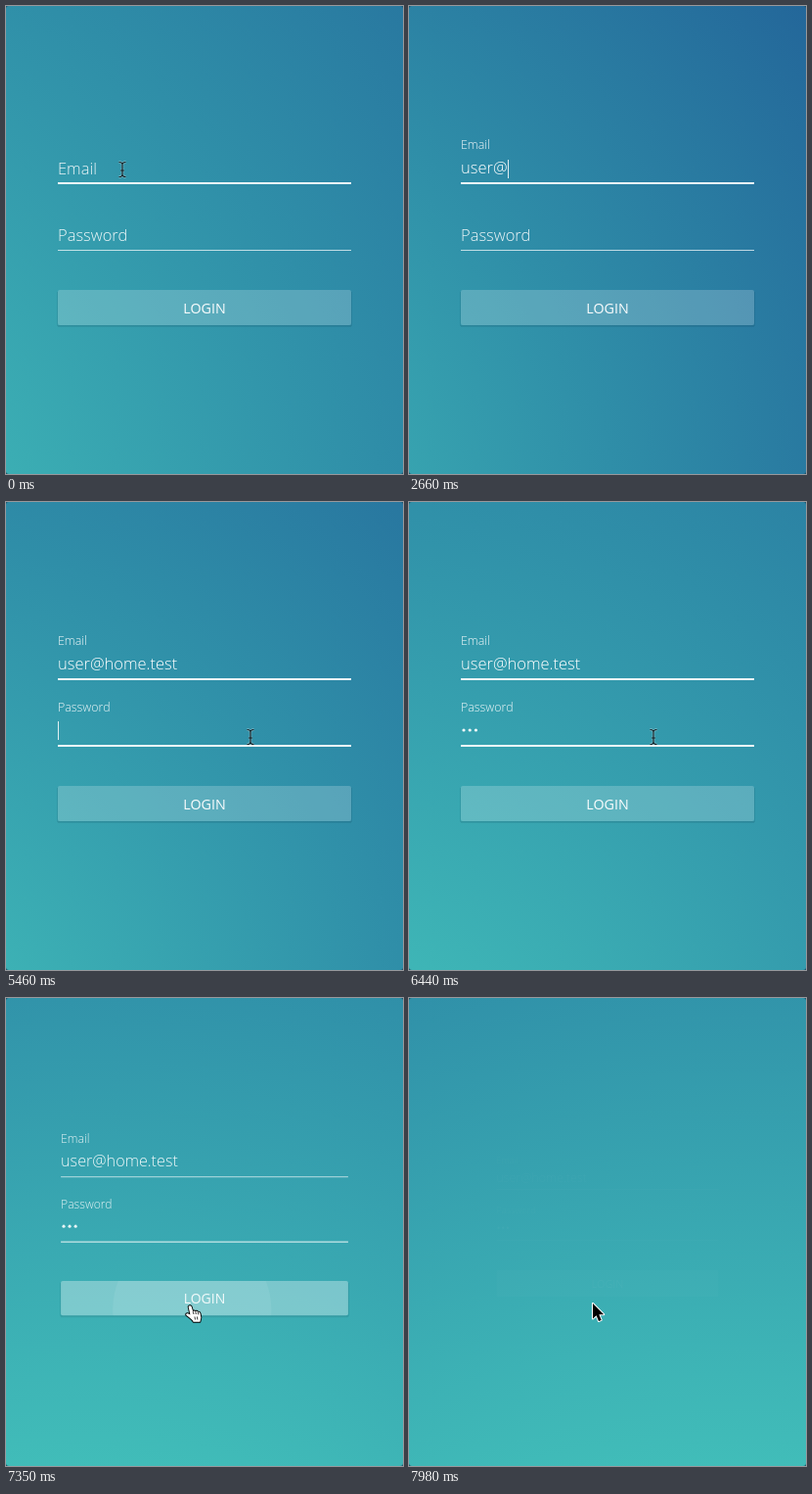
Recreate the animation shown at these times as an HTML page with a canvas. Size 406 by 478 pixels, loop 8000 ms.

```html
<!DOCTYPE html>
<html lang="en">
<head>
<meta charset="utf-8">
<title>Login</title>
<style>
  html, body { margin: 0; width: 100%; height: 100%; overflow: hidden; background: #1c4f66; }
  canvas { display: block; width: 406px; height: 478px; }
</style>
</head>
<body>
<canvas id="stage"></canvas>
<script>
const W = 406, H = 478, LOOP = 8000, LEFT = 53, RIGHT = 353;
const canvas = document.getElementById('stage');
const ctx = canvas.getContext('2d');
const dpr = window.devicePixelRatio || 1;
canvas.width = W * dpr;
canvas.height = H * dpr;

const FAMILY = '"Open Sans", "Noto Sans", sans-serif';
const ADDRESS = 'user@home.test';
const KEYS = [1820, 2030, 2170, 2380, 2660, 2800, 2940, 3150, 3290, 3570, 3780, 3990, 4130, 4270];
const DOTS = [5600, 5670, 5810];

// time, glow centre x and y, inner radius, span
const GLOW = [
  [0, -380, 660, 251, 1064],
  [2660, -300, 560, 52, 926],
  [4270, -260, 520, 30, 833],
  [6440, -112, 700, 157, 1150],
  [6930, -66, 870, 397, 1053],
  [7560, 150, 1080, 598, 1110],
  [8000, 346, 1238, 760, 1110]
];
// time, pointer x and y
const POINTER = [
  [0, 119, 167], [4830, 119, 167], [5110, 250, 240],
  [6460, 250, 240], [6860, 188, 314], [7600, 188, 314], [7840, 188, 312]
];

const clamp = v => Math.max(0, Math.min(1, v));
const ramp = (t, from, to) => clamp((t - from) / (to - from));
const smooth = p => p * p * (3 - 2 * p);
const mix = (a, b, p) => a + (b - a) * p;
const typed = (keys, t) => keys.filter(k => k <= t).length;
const white = a => `rgba(255,255,255,${a})`;

function sample(track, t, ease = p => p) {
  let i = 0;
  while (i < track.length - 2 && t >= track[i + 1][0]) i++;
  const a = track[i], b = track[i + 1];
  const p = ease(ramp(t, a[0], b[0]));
  return a.slice(1).map((v, n) => mix(v, b[n + 1], p));
}

function drawBackground(t) {
  const [x, y, inner, span] = sample(GLOW, t);
  const g = ctx.createRadialGradient(x, y, inner, x, y, inner + span);
  g.addColorStop(0, 'rgb(65,189,185)');
  g.addColorStop(0.5, 'rgb(47,142,168)');
  g.addColorStop(1, 'rgb(33,95,151)');
  ctx.fillStyle = '#1c4f66';
  ctx.fillRect(0, 0, W, H);
  ctx.fillStyle = g;
  ctx.beginPath();
  ctx.roundRect(0, 0, W, H, 3);
  ctx.fill();
}

function text(str, x, y, size, weight, alpha) {
  ctx.font = `${weight} ${size}px ${FAMILY}`;
  ctx.fillStyle = white(alpha);
  ctx.fillText(str, x, y);
}

function drawField(name, y, lift, focus) {
  text(name, LEFT, mix(y - 9, y - 35, lift), mix(16.5, 12.4, lift), 300, 0.92);
  ctx.fillStyle = white(mix(0.7, 0.92, focus));
  ctx.fillRect(LEFT, y - focus, RIGHT - LEFT, 1 + focus);
}

function drawCaret(x, y) {
  ctx.fillStyle = white(0.85);
  ctx.fillRect(Math.round(x), y - 9, 1, 19);
}

// Solid after each key press, then blinking
function caretOn(t, start, keys) {
  const last = keys.filter(k => k <= t).pop() || start;
  return Math.floor((t - last) / 530) % 2 === 0;
}

function drawButton(t) {
  const hover = ramp(t, 6720, 6880);
  ctx.fillStyle = 'rgba(0,40,60,.16)';
  ctx.fillRect(LEFT, 326, 300, 1);
  ctx.fillStyle = 'rgba(0,40,60,.1)';
  ctx.fillRect(LEFT, 327, 300, 1);
  ctx.fillRect(LEFT - 1, 292, 1, 35);
  ctx.fillRect(RIGHT, 292, 1, 35);
  ctx.save();
  ctx.beginPath();
  ctx.roundRect(LEFT, 290, 300, 36, 2);
  ctx.fillStyle = white(mix(0.2, 0.36, hover));
  ctx.fill();
  if (t >= 7030) {
    ctx.clip();
    ctx.beginPath();
    ctx.arc(190, 320, (t - 7030) * 0.258, 0, 7);
    ctx.fillStyle = white(0.08);
    ctx.fill();
  }
  ctx.restore();
  ctx.textAlign = 'center';
  text('LOGIN', 203, 314, 14.3, 400, 0.97);
  ctx.textAlign = 'left';
}

function drawForm(t) {
  const exit = Math.pow(ramp(t, 7210, 8000), 1.45);
  const scale = 1 - 0.25 * exit;
  ctx.save();
  ctx.globalAlpha = 1 - exit;
  ctx.translate(203, 240);
  ctx.scale(scale, scale);
  ctx.translate(-203, -240);

  drawField('Email', 181, smooth(ramp(t, 280, 580)), 1 - ramp(t, 6500, 6720));
  const focus = ramp(t, 5110, 5320) * (1 - ramp(t, 7210, 7420));
  drawField('Password', 249, smooth(ramp(t, 5110, 5410)), focus);

  const entry = ADDRESS.slice(0, typed(KEYS, t));
  text(entry, LEFT, 171, 16.5, 300, 1);
  if (t >= 580 && t < 5110 && caretOn(t, 580, KEYS)) {
    drawCaret(LEFT + ctx.measureText(entry).width, 166);
  }

  const count = typed(DOTS, t);
  ctx.fillStyle = white(0.95);
  for (let i = 0; i < count; i++) {
    ctx.beginPath();
    ctx.arc(56 + i * 6.2, 233, 1.6, 0, 7);
    ctx.fill();
  }
  if (t >= 5410 && t < 7210 && caretOn(t, 5410, DOTS)) drawCaret(LEFT + count * 6.1, 233);

  drawButton(t);
  ctx.restore();
}

function outline(path, fill, edge, width) {
  ctx.lineJoin = 'round';
  ctx.lineWidth = width;
  ctx.strokeStyle = edge;
  ctx.fillStyle = fill;
  ctx.stroke(path);
  ctx.fill(path);
}

const BEAM = new Path2D('M-3.5-7.5Q0-7.5 0-5Q0-7.5 3.5-7.5M0-5V5M-3.5 7.5Q0 7.5 0 5Q0 7.5 3.5 7.5M-2 1H2');
const ARROW = new Path2D('M0 0V15.5L3.6 12.2L6 18L8.7 16.9L6.3 11.2H11.2Z');
const HAND = new Path2D('M-1.4 1.2Q0-.8 1.6 1L3.2 6.2Q4.2 4.7 5.6 6Q7 5 8.2 6.7Q10 6.2 10.6 8.2L11.4 12.4L10.4 16.8H3.6Q2.8 14.6-.6 12.2L-3.8 9.8Q-4.2 7.8-2 8.2L.4 9.6Z');
const FINGERS = new Path2D('M3.2 6.2L4 9M5.8 6.2L6.4 9M8.3 6.8L8.8 9.4M5 11.5L5.5 14.5M7.5 11.5L7.8 14.5');

function drawPointer(t) {
  const hidden = (t >= 1820 && t < 4830) || (t >= 5600 && t < 6370);
  if (hidden) return;
  const [x, y] = sample(POINTER, t, smooth);
  ctx.save();
  ctx.translate(x, y);
  if (t >= 7840) {
    outline(ARROW, '#000', '#fff', 2);
  } else if (y > 290) {
    outline(HAND, '#fff', '#000', 1.8);
    ctx.lineWidth = 0.8;
    ctx.stroke(FINGERS);
  } else if (y < 252) {
    ctx.strokeStyle = white(0.4);
    ctx.lineWidth = 2.4;
    ctx.stroke(BEAM);
    ctx.strokeStyle = '#0b1c22';
    ctx.lineWidth = 1.2;
    ctx.stroke(BEAM);
  } else {
    outline(ARROW, '#000', '#fff', 2);
  }
  ctx.restore();
}

function frame() {
  const t = performance.now() % LOOP;
  ctx.setTransform(dpr, 0, 0, dpr, 0, 0);
  drawBackground(t);
  drawForm(t);
  drawPointer(t);
  requestAnimationFrame(frame);
}
frame();
</script>
</body>
</html>
```
